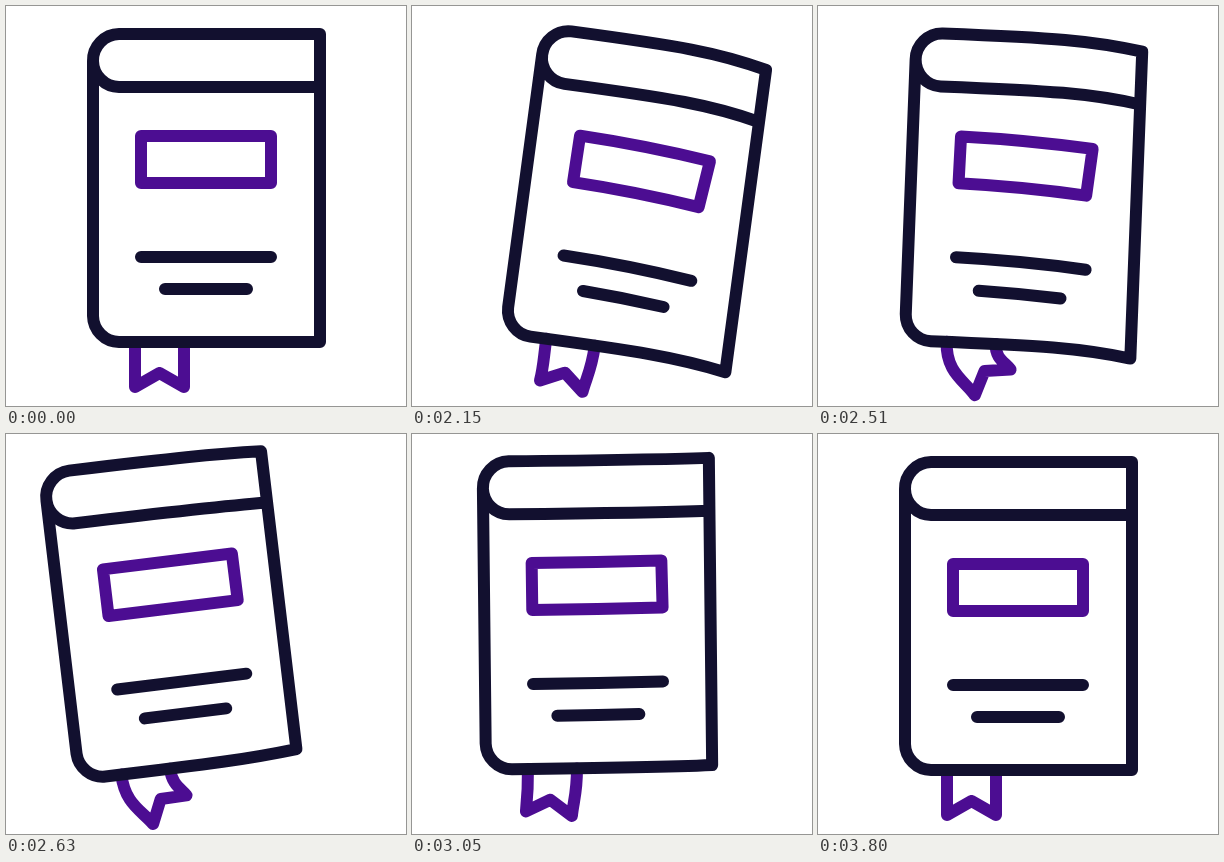
An HTML page that plays this animation: 400x400 px, repeating every 3830 ms.

```html
<!DOCTYPE html>
<html lang="en">
<head>
<meta charset="utf-8">
<title>Book</title>
<style>
  html, body { margin: 0; width: 100%; height: 100%; overflow: hidden; background: #fff; }
  svg { display: block; width: 100vw; height: 100vh; }
  path { fill: none; stroke: #12102f; stroke-width: 12; stroke-linecap: round; stroke-linejoin: round; }
  .accent { stroke: #4c0d92; }
</style>
</head>
<body>
<svg viewBox="0 0 400 400">
  <g id="book">
    <path id="ribbon" class="accent"/>
    <path id="cover"/>
    <path id="label" class="accent"/>
    <path id="lines"/>
  </g>
</svg>
<script>
const LOOP = 3830, START = 2030, STEP = 30;
const R = 26.5;                              // corner radius
const TOP = -282, FOLD = -229, BASE = 26;    // edges, measured from the foot of the spine

const el = id => document.getElementById(id);
const rad = a => a * Math.PI / 180;
const pt = (x, y) => x.toFixed(2) + " " + y.toFixed(2);

// Cosine easing from one turning point to the next
function ease(t, times, values) {
  const i = times.findIndex(time => time > t);
  if (t < START || i < 1) return 0;
  const u = (t - times[i - 1]) / (times[i] - times[i - 1]);
  return values[i - 1] + (values[i] - values[i - 1]) * (1 - Math.cos(Math.PI * u)) / 2;
}

// Three dying swings: right, left, right; `left` is the time of the second peak
const swing = (t, left, ...peaks) =>
  ease(t, [1980, 2305, left, 3260, 3700], [0, ...peaks, 0]);

function draw(t) {
  const tilt = swing(t, 2700, 14.3, -8.5, 2.9);
  const bend = swing(t, 2840, 20, -11, 7.7);
  const x = 87 + swing(t, 2830, 17, -32, 4);
  const y = 310 + swing(t, 2720, -16, 13, -7);
  const flap = ease(t, [2000, 2180, 2600, 2900, 3260, 3700], [0, 16, -42, 16, -12, 0]);
  const squeeze = Math.max(0.4 * tilt, -1.2 * tilt);
  const w = 227 - squeeze, span = w - 26;

  el("book").setAttribute("transform", `translate(${pt(x, y)}) rotate(${tilt.toFixed(3)})`);
  drawCover(w, span, bend, squeeze);
  drawInside(span, bend);
  drawRibbon(span, bend, tilt, flap);
}

function drawCover(w, span, bend, squeeze) {
  const arc = (sweep, py) => `A${R} ${R} 0 0 ${sweep} ` + pt(26, py);
  // Flat near the spine, bending towards the free edge
  const edge = (py, drop) => {
    const d = bend + drop;
    return "C" + pt(26 + 0.55 * span, py) + " " + pt(26 + 0.75 * span, py + 0.1 * d)
      + " " + pt(w, py + d);
  };
  el("cover").setAttribute("d",
    "M0 -255" + arc(1, TOP) + edge(TOP, squeeze / 2)
    + "L" + pt(w, BASE + bend - squeeze / 2)
    + "M0 -255" + arc(0, FOLD) + edge(FOLD, squeeze / 3)
    + "M0 -255L0 0" + arc(0, BASE) + edge(BASE, -squeeze / 2));
}

function drawInside(span, bend) {
  const k = 1.3 * bend / span ** 2;
  const sag = px => k * (px - 26) ** 2;
  const lean = px => 2 * k * (px - 26);
  // Part of a parabola; both ends shift sideways so that corners stay square
  const curve = (x0, x1, py, shift = 0) => {
    const xm = (x0 + x1) / 2;
    const s0 = shift * lean(x0), s1 = shift * lean(x1);
    return pt(x0 + s0, py + sag(x0))
      + "Q" + pt(xm + (s0 + s1) / 2, py + sag(x0) + lean(x0) * (xm - x0))
      + " " + pt(x1 + s1, py + sag(x1));
  };
  el("label").setAttribute("d",
    "M" + curve(48, 178, -180, 23.5) + "L" + curve(178, 48, -133, -23.5) + "Z");
  el("lines").setAttribute("d", "M" + curve(48, 178, -59) + "M" + curve(72, 154, -27));
}

// The ribbon hangs from the bottom edge and trails behind the tilt
function drawRibbon(span, bend, tilt, flap) {
  const hang = px => BASE + bend * ((px - 26) / span) ** 3;
  const aim = rad(0.8 * flap - tilt), end = rad(flap - tilt);
  const sin = Math.sin(end), cos = Math.cos(end);
  const half = 24.5 - Math.min(10, Math.abs(flap)) * 0.25;
  const cx = 66.5 - 45 * Math.sin(aim), cy = hang(66.5) + 45 * Math.cos(aim);
  const tip = (dx, dy) => [cx + dx * cos - dy * sin, cy + dx * sin + dy * cos];

  const side = (px, dx) => {
    const py = hang(px), [ex, ey] = tip(dx, 0);
    const reach = Math.hypot(ex - px, ey - py);
    return "M" + pt(px, py) + "C" + pt(px, py + 0.5 * reach) + " "
      + pt(...tip(dx, -0.3 * reach)) + " " + pt(ex, ey) + "L" + pt(...tip(0, -14));
  };
  el("ribbon").setAttribute("d", side(42, -half) + side(91, half));
}

const begin = performance.now();
function tick() {
  const t = (performance.now() - begin) % LOOP;
  draw(START + Math.floor((t - START) / STEP) * STEP);
  requestAnimationFrame(tick);
}
tick();
</script>
</body>
</html>
```
